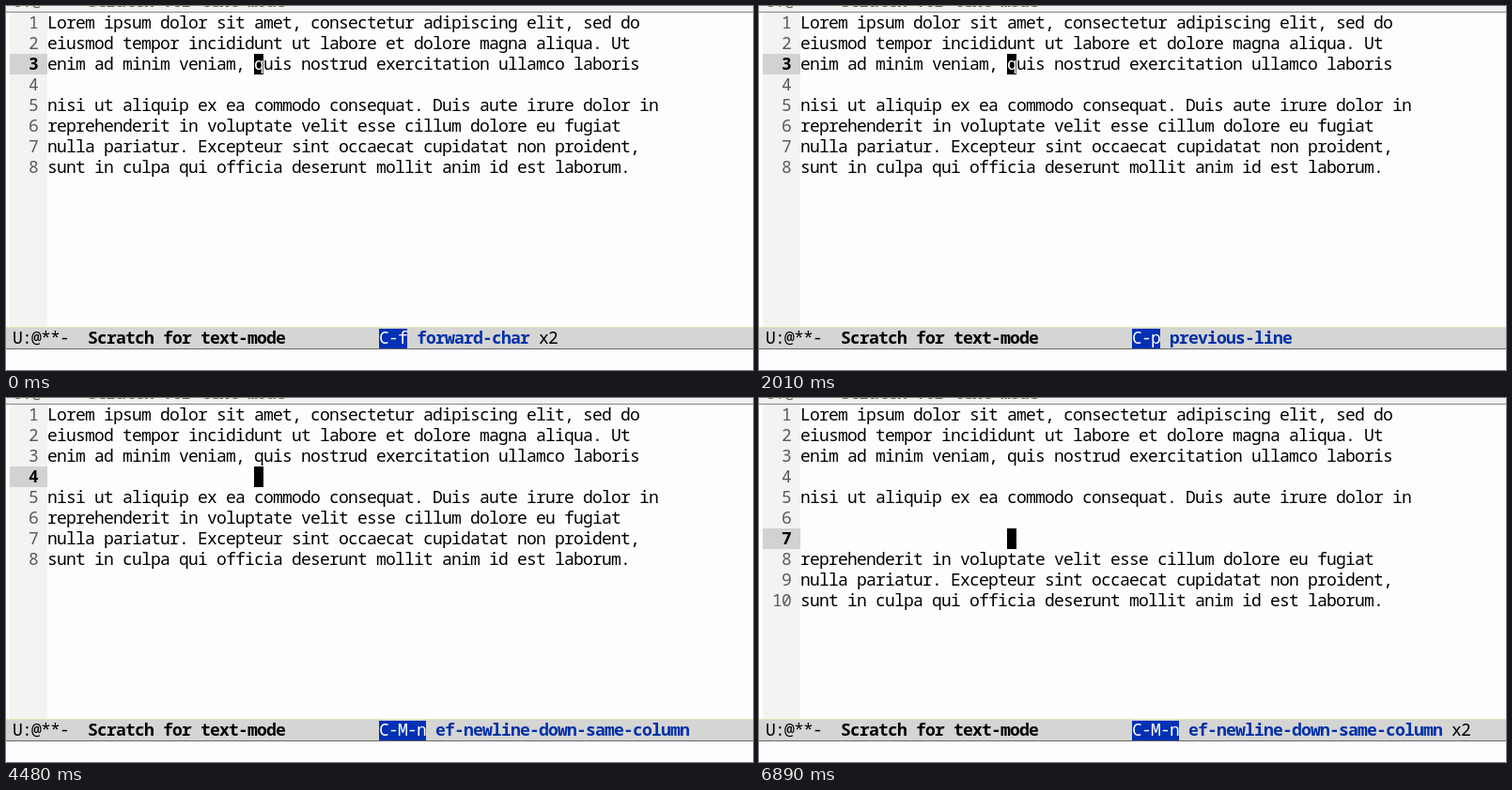
Animation of 795x388 px, one loop 8000 ms. Source, as an HTML page:

```html
<!DOCTYPE html>
<html lang="la">
<head>
<meta charset="utf-8">
<title>Editor line motion</title>
<style>
  html, body { margin: 0; width: 100%; height: 100%; overflow: hidden; background: #fdfdff; }
  #stage {
    position: relative; width: 795px; height: 388px; overflow: hidden;
    color: #000; font: 18px/22px "Noto Sans Mono", "DejaVu Sans Mono", monospace;
    font-variant-ligatures: none;
  }
  #stage div, #stage span, #stage b { position: absolute; white-space: pre; }
  /* One character per 10px cell */
  .text { height: 22px; letter-spacing: calc(10px - 1ch); }
  .bar { left: 0; width: 795px; box-sizing: border-box; }
  #upper { top: -18px; height: 25px; background: #f0f0ee; border-bottom: 1px solid #858585; color: #66665c; }
  #lower { top: 342px; height: 24px; background: #d5d5d3; border: solid #666; border-width: 1px 0; border-top-color: #e2e2b8; }
  #gutter { left: 4px; top: 7px; width: 40px; height: 335px; background: #f3f3f2; }
  #current { left: 4px; width: 40px; height: 22px; background: #d2d2d2; }
  #cursor { width: 10px; height: 22px; background: #000; }
  #key { left: 397px; top: 344px; height: 21px; background: #0030b4; }
  .blue { color: #0030a8; }
</style>
</head>
<body>
<div id="stage">
  <div id="gutter"></div>
  <div id="current"></div>
  <div id="upper" class="bar"></div>
  <div id="lower" class="bar"></div>
  <div id="cursor"></div>
  <div id="key"></div>
  <div id="view"></div>
</div>
<script>
const LOOP = 8000, CELL = 10, ROW = 22, LEFT = 44, TOP = 7, COLUMN = 22;
const head = [
  "Lorem ipsum dolor sit amet, consectetur adipiscing elit, sed do",
  "eiusmod tempor incididunt ut labore et dolore magna aliqua. Ut",
  "enim ad minim veniam, quis nostrud exercitation ullamco laboris",
  "",
  "nisi ut aliquip ex ea commodo consequat. Duis aute irure dolor in"
];
const tail = [
  "reprehenderit in voluptate velit esse cillum dolore eu fugiat",
  "nulla pariatur. Excepteur sint occaecat cupidatat non proident,",
  "sunt in culpa qui officia deserunt mollit anim id est laborum."
];
const newline = "ef-newline-down-same-column";

// Start time, cursor line, cursor column, added lines, key, command, repeat
const steps = [
  [0, 3, COLUMN, 0, "C-f", "forward-char", "x2"],
  [900, 4, 0, 0, "C-n", "next-line", ""],
  [1860, 3, COLUMN, 0, "C-p", "previous-line", ""],
  [2810, 4, COLUMN, 0, "C-M-n", newline, ""],
  [4910, 5, COLUMN, 0, "C-n", "next-line", ""],
  [5640, 6, COLUMN, 1, "C-M-n", newline, ""],
  [6380, 7, COLUMN, 2, "C-M-n", newline, "x2"]
];

const $ = id => document.getElementById(id);
const rowTop = line => TOP + (line - 1) * ROW;

function put(parent, text, x, y, { bold = false, color = "", blue = false } = {}) {
  const el = document.createElement(bold ? "b" : "span");
  el.className = blue ? "text blue" : "text";
  el.textContent = text;
  el.style.left = x + "px";
  el.style.top = y + "px";
  if (color) el.style.color = color;
  parent.append(el);
}

function modeLine(bar, y) {
  put(bar, "U:@**-", 7, y);
  put(bar, "Scratch for text-mode", 87, y, { bold: true });
}

function draw([, line, column, added, key, command, repeat]) {
  const view = $("view");
  view.replaceChildren();
  const lines = [...head, ...Array(added).fill(""), ...tail];
  lines.forEach((text, i) => {
    const n = i + 1, y = rowTop(n) - 1, active = n === line;
    put(view, String(n).padStart(3), 4, y, { bold: active, color: active ? "#000" : "#5b5b5b" });
    put(view, text, LEFT, y);
  });

  const x = LEFT + column * CELL;
  $("current").style.top = $("cursor").style.top = rowTop(line) + "px";
  $("cursor").style.left = x + "px";
  put(view, lines[line - 1][column] || "", x, rowTop(line) - 1, { color: "#fff" });

  const commandX = 397 + (key.length + 1) * CELL;
  $("key").style.width = key.length * CELL + "px";
  put(view, key, 397, 342, { color: "#fff" });
  put(view, command, commandX, 342, { bold: true, blue: true });
  put(view, repeat, commandX + (command.length + 1) * CELL, 342);
}

modeLine($("upper"), 1);
modeLine($("lower"), -1);

const start = performance.now();
let shown;
function tick() {
  const time = (performance.now() - start) % LOOP;
  const step = steps.findLast(([at]) => at <= time);
  if (step !== shown) draw(shown = step);
  requestAnimationFrame(tick);
}
tick();
</script>
</body>
</html>
```
